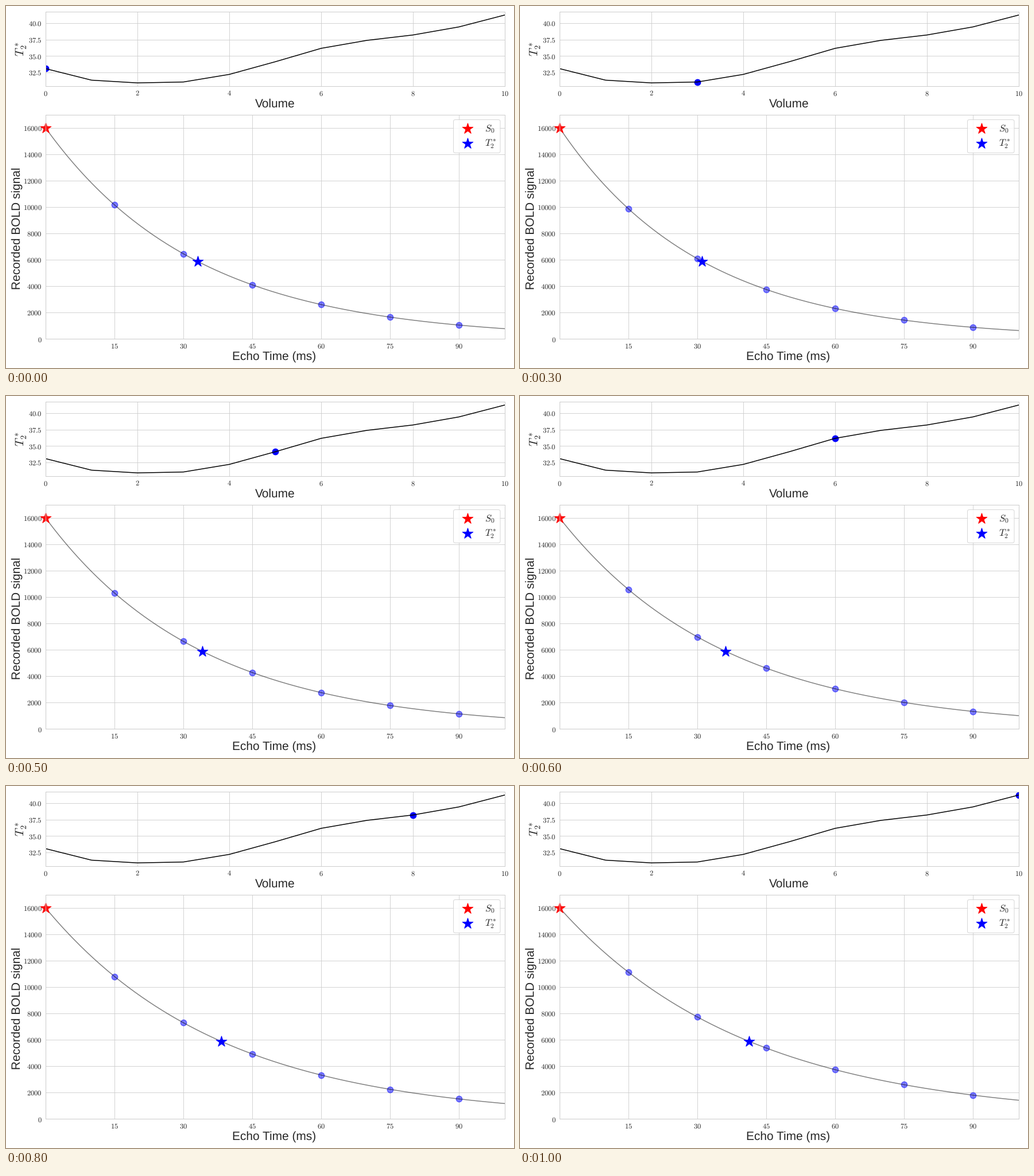
Animation, 885 px wide and 632 px high, one loop 1100 ms. Source, as a matplotlib script:

```python
import matplotlib.pyplot as plt
import numpy as np
from matplotlib.animation import FuncAnimation
from matplotlib.patches import FancyBboxPatch
from matplotlib.transforms import IdentityTransform

W, H, DPI = 885, 632, 64
INK, RULE = "#262626", "#cccccc"
S0 = 16000
T2 = np.array([33.08, 31.32, 30.9, 31.04, 32.2, 34.13,
               36.18, 37.4, 38.22, 39.45, 41.27])
ECHOES = np.arange(15, 91, 15)
TE = np.linspace(0, 100, 201)

plt.rcParams.update({
    "font.family": "Liberation Sans",
    "mathtext.fontset": "cm",
    "text.hinting": "none",
    "text.color": INK,
    "axes.edgecolor": RULE,
    "axes.axisbelow": True,
})


def pt(px):
    return px * 72 / DPI


fig = plt.figure(figsize=(W / DPI, H / DPI), dpi=DPI, facecolor="white")
PIXELS = IdentityTransform()


def panel(top, bottom, xticks, yticks, yfmt):
    left, right = 69, 869
    ax = fig.add_axes([left / W, 1 - bottom / H,
                       (right - left) / W, (bottom - top) / H])
    ax.set_xticks(xticks, [f"${x}$" for x in xticks])
    ax.set_yticks(yticks, [f"${y:{yfmt}}$" for y in yticks])
    ax.tick_params(length=0, pad=pt(6.2), labelsize=pt(12.5), labelcolor=INK)
    ax.grid(color=RULE, lw=pt(0.85))
    for spine in ax.spines.values():
        spine.set_linewidth(pt(1))
    return ax


def label(x, y, text, size=20.9, **kw):
    kw = {"ha": "center", "va": "baseline", **kw}
    fig.text(x, H - y, text, fontsize=pt(size), transform=PIXELS, **kw)


def dot(ax, x, y, **kw):
    return ax.scatter(x, y, s=pt(10.3) ** 2, color="blue",
                      linewidths=pt(1.5), **kw)


def star(ax, x, y, color, **kw):
    kw = {"zorder": 2.2, **kw}
    return ax.scatter([x], [y], s=pt(19.5) ** 2, marker="*", color=color,
                      linewidths=pt(1), **kw)


top = panel(9.8, 140.2, range(0, 11, 2), [32.5, 35.0, 37.5, 40.0], ".1f")
main = panel(189.9, 581.3, ECHOES, range(0, 16001, 2000), "d")

label(469, 176.8, "Volume")
label(467.5, 618, "Echo Time (ms)")
label(25, 388, "Recorded BOLD signal", rotation=90, rotation_mode="anchor")
label(27, 75.2, "$T_2^*$", rotation=90, va="center")

top.plot(range(len(T2)), T2, color="black", lw=pt(1.5))
cursor = dot(top, [0], [T2[0]])

curve, = main.plot([], [], color="black", alpha=0.5, lw=pt(1.5))
echoes = dot(main, ECHOES, ECHOES, alpha=0.5)
star(main, 0, S0, "red", clip_on=False)
decay = star(main, 0, 0, "blue")

# Legend
main.add_patch(FancyBboxPatch(
    (779.5, H - 256.5), 81.5, 58, boxstyle="round,pad=0,rounding_size=3.3",
    fc="white", ec=RULE, lw=pt(1), alpha=0.8, transform=PIXELS, zorder=5))
for name, color, y, base in (("$S_0$", "red", 214.3, 218.5),
                             ("$T_2^*$", "blue", 240, 245)):
    star(main, 803.5, H - y, color, transform=PIXELS, zorder=6)
    label(834.5, base, name, 16.7, ha="left")

pad = 0.05 * np.ptp(T2)
top.set(xlim=(0, 10), ylim=(T2.min() - pad, T2.max() + pad))
main.set(xlim=(0, 100), ylim=(0, 17000))


def draw(i):
    t2 = T2[i]

    def signal(t):
        return S0 * np.exp(-t / t2)

    cursor.set_offsets([(i, t2)])
    curve.set_data(TE, signal(TE))
    echoes.set_offsets(np.column_stack([ECHOES, signal(ECHOES)]))
    decay.set_offsets([(t2, signal(t2))])
    return cursor, curve, echoes, decay


anim = FuncAnimation(fig, draw, frames=len(T2), interval=100,
                     repeat=True, repeat_delay=0)
plt.show()
```
